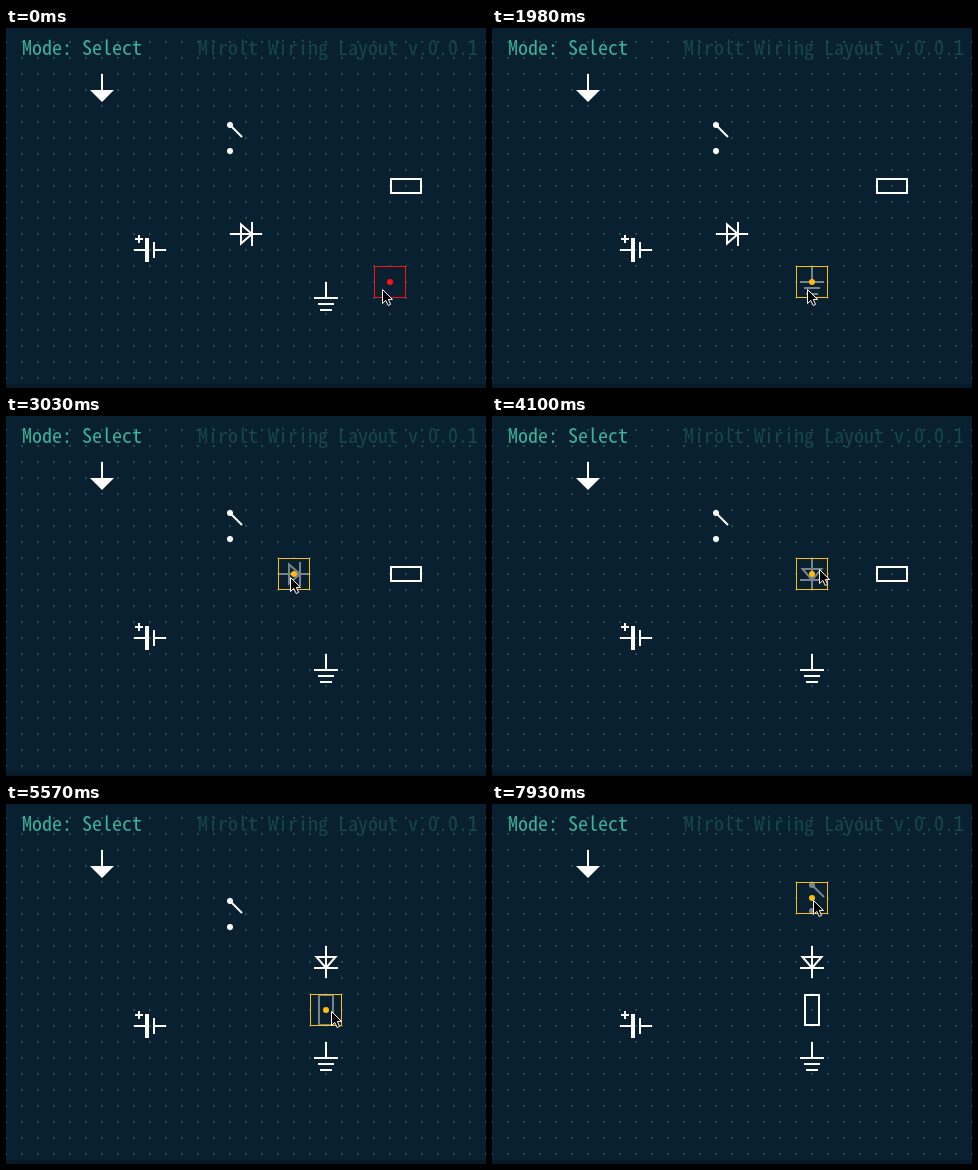
An HTML page that plays this animation: 480x360 px, repeating every 8 s.

```html
<!DOCTYPE html>
<html lang="en">
<head>
<meta charset="utf-8">
<title>Schematic editor</title>
<style>
  html, body { margin: 0; width: 100%; height: 100%; overflow: hidden; background: #08202f; }
  svg { display: block; width: 480px; height: 360px; }
  text { font: 16.667px "Noto Sans Mono", monospace; white-space: pre; }
  /* Same advance for every family: 10px per character */
  @supports (font-size-adjust: ch-width 0.6) {
    text { font-family: "Noto Sans Mono CJK JP", "Noto Sans Mono", monospace; font-size-adjust: ch-width 0.6; }
  }
  .part { fill: none; stroke: #fff; stroke-width: 2; }
  .solid { fill: #fff; stroke: none; }
</style>
</head>
<body>
<svg viewBox="0 0 480 360">
  <defs>
    <pattern id="grid" x="-1" y="13" width="16" height="16" patternUnits="userSpaceOnUse">
      <rect width="2" height="2" fill="#224c55"/>
    </pattern>
  </defs>
  <rect width="480" height="360" fill="#08202f"/>
  <rect width="480" height="356" fill="url(#grid)"/>
  <rect y="356" width="480" height="4" fill="#061a28"/>
  <text x="16" y="27" fill="#3db39b">Mode: Select</text>
  <text x="192" y="27" fill="#17474c">Mirolt Wiring Layout v.0.0.1</text>

  <g class="part" id="probe">
    <path d="M0-16V0"/><path class="solid" d="M-12 0H12L0 12Z"/>
  </g>
  <g class="part" id="battery">
    <path d="M-16 0H-4M4 0H16M4-8V8M-15-11H-7M-11-15V-7"/>
    <path d="M-3-12V12" stroke-width="4"/>
  </g>
  <g class="part" id="ground"><path d="M0-16V0M-12 0H12M-8 6H8M-6 12H6"/></g>
  <g class="part" id="diode"><path d="M-16 0H16M6-12V12M-5-9.5V9.5L6 0Z"/></g>
  <g class="part" id="resistor"><path d="M-15-7H15V7H-15Z"/></g>
  <g class="part" id="switch">
    <path d="M0-13L12-1"/>
    <circle class="solid" cy="-13" r="3"/><circle class="solid" cy="13" r="3"/>
  </g>

  <g id="box">
    <rect x="-15.5" y="-15.5" width="31" height="31" fill="none" stroke="currentColor"/>
    <circle r="3" fill="currentColor"/>
  </g>
  <path id="mouse" d="M-.5.5V14.5L2.8 11.4L5.2 16.5L7.6 15.4L5.3 10.4H9.5Z" fill="#000" stroke="#fff"/>
</svg>
<script>
const LOOP = 8000, STEP = 80, START = [377, 261];
const RED = '#ff1010', YELLOW = '#fdbe0c';
const byId = id => document.getElementById(id);
const box = byId('box'), mouse = byId('mouse');

const homes = {
  probe: [96, 62], battery: [144, 222], ground: [320, 270],
  diode: [240, 206], resistor: [400, 158], switch: [224, 110]
};

// One leg of the mouse path; a spin turns the carried part once per step
const leg = (at, steps, to, carry, spin) => ({ at, steps, to, carry, spin });
const legs = [
  leg(500, 4, [315, 265]),
  leg(910, 1, [313, 268]),
  leg(1080, 5, [300, 282], 'ground'),
  leg(1820, 3, [316, 261], 'ground'),
  leg(2150, 8, [238, 205]),
  leg(2790, 3, [251, 190], 'diode'),
  leg(3030, 1, [285, 161], 'diode'),
  leg(3110, 2, [303, 158], 'diode'),
  leg(3360, 1, [303, 158], 'diode', true),
  leg(3690, 2, [310, 157], 'diode', true),
  leg(3940, 3, [328, 153], 'diode'),
  leg(4520, 4, [397, 157]),
  leg(4930, 8, [326, 207], 'resistor'),
  leg(5570, 1, [326, 207], 'resistor', true),
  leg(5900, 7, [410, 98]),
  leg(6710, 1, [382, 95]),
  leg(6790, 4, [224, 110]),
  leg(7530, 6, [322, 96], 'switch')
];

const mix = (a, b, u) => a.map((v, i) => Math.round(v + (b[i] - v) * u));
const toGrid = v => Math.ceil(v / 16 - 0.5) * 16;
const snap = ([x, y]) => [toGrid(x), toGrid(y - 14) + 14];
const place = (el, [x, y], turn = 0) =>
  el.setAttribute('transform', `translate(${x} ${y}) rotate(${turn})`);

function stateAt(t) {
  const spots = { ...homes }, turns = {};
  let tip = START;
  for (const { at, steps, to, carry, spin } of legs) {
    if (t < at) break;
    const done = Math.min(steps, Math.floor((t - at) / STEP) + 1);
    tip = mix(tip, to, done / steps);
    if (carry) spots[carry] = snap(tip);
    if (spin) turns[carry] = (turns[carry] || 0) + done;
  }
  return { tip, spots, turns };
}

function draw(t) {
  const { tip, spots, turns } = stateAt(t);
  const cell = snap(tip);
  let hit = false;
  for (const id in spots) {
    const over = String(spots[id]) === String(cell);
    hit = hit || over;
    place(byId(id), spots[id], -90 * (turns[id] || 0));
    byId(id).setAttribute('opacity', over ? 0.45 : 1);
  }
  place(box, cell);
  box.setAttribute('color', hit ? YELLOW : RED);
  place(mouse, tip);
}

const origin = performance.now();
function tick(now) {
  draw(Math.max(0, now - origin) % LOOP);
  requestAnimationFrame(tick);
}
draw(0);
requestAnimationFrame(tick);
</script>
</body>
</html>
```
